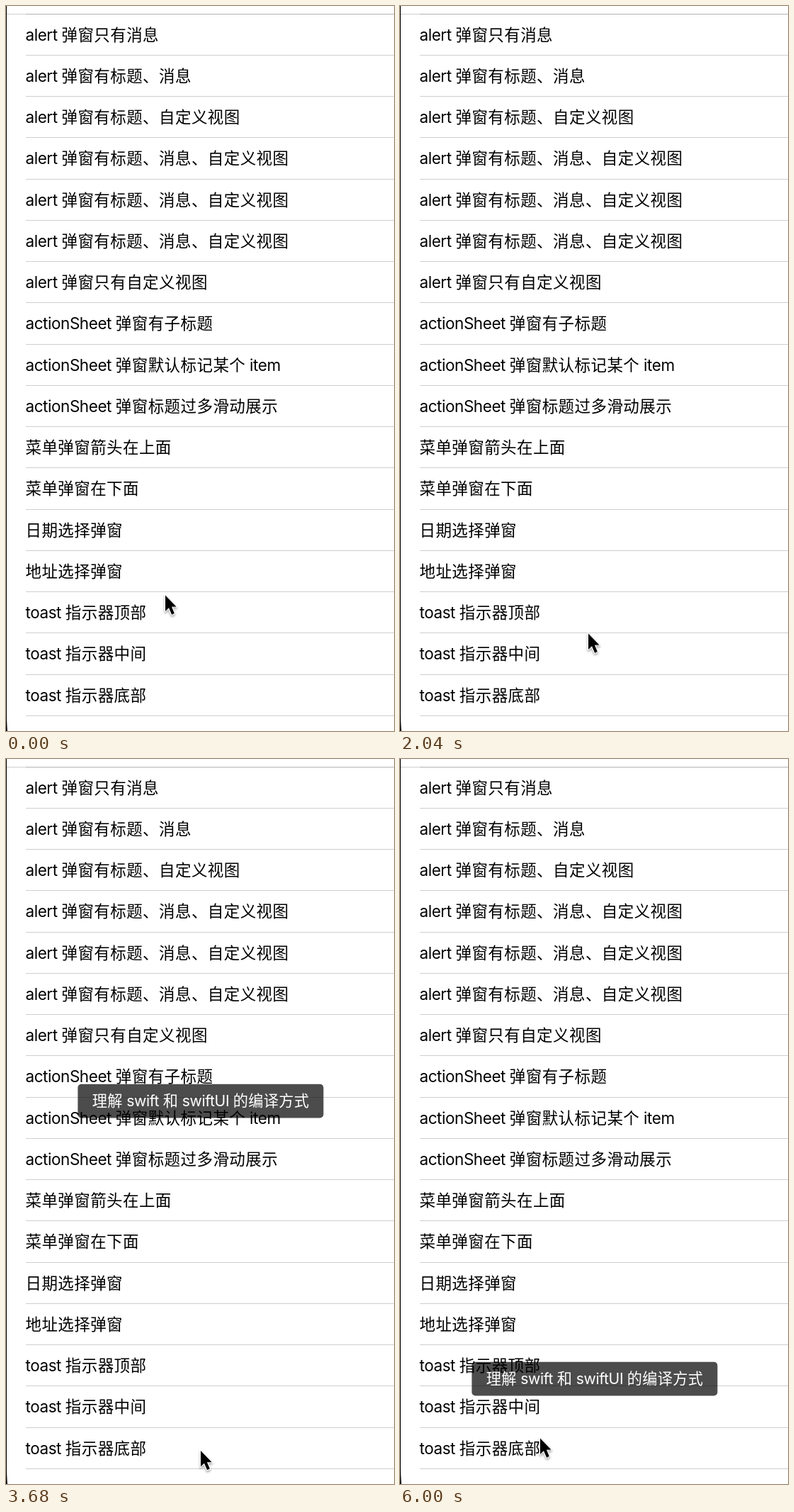
Write an HTML page that moves like this. It is 548 px wide and 1023 px high and loops after 6.16 s.

```html
<!DOCTYPE html>
<html lang="zh-CN">
<head>
<meta charset="utf-8">
<title>Toast</title>
<style>
html, body { margin: 0; width: 100%; height: 100%; overflow: hidden; background: #fff; }
svg { display: block; width: 548px; height: 1023px; }
text { font: 22.5px "Noto Sans CJK SC", "Noto Sans CJK", sans-serif; letter-spacing: .42px; }
.latin { font-family: Inter, sans-serif; letter-spacing: -.45px; }
.toast text { font-size: 21.2px; letter-spacing: .27px; fill: #fff; }
.toast .latin { letter-spacing: -.38px; }
.line { fill: #cfcfd1; shape-rendering: crispEdges; }
.press { fill: #d1d1d6; shape-rendering: crispEdges; }

.press, .toast, #cursor { animation: 6160ms linear infinite both; }
.press { opacity: 0; }
.press.top { animation-name: press-top; }
.press.mid { animation-name: press-mid; }
.press.low { animation-name: press-low; }
.toast.top { animation-name: toast-top; }
.toast.mid { animation-name: toast-mid; }
.toast.low { animation-name: toast-low; }
#cursor { animation-name: move; animation-timing-function: ease-in-out; }

@keyframes press-top {
  0%, 7.142% { opacity: 0; }
  7.143%, 7.792% { opacity: 1; }
  14.286%, 100% { opacity: 0; }
}
@keyframes press-mid {
  0%, 38.96% { opacity: 0; }
  38.961%, 43.506% { opacity: 1; }
  50%, 100% { opacity: 0; }
}
@keyframes press-low {
  0%, 74.674% { opacity: 0; }
  74.675%, 79.221% { opacity: 1; }
  85.714%, 100% { opacity: 0; }
}
@keyframes toast-top {
  0% { opacity: 0; }
  6.494% { opacity: 0; animation-timing-function: ease; }
  12.175%, 31.817% { opacity: 1; }
  31.818%, 100% { opacity: 0; }
}
@keyframes toast-mid {
  0% { opacity: 0; }
  42.614% { opacity: 0; animation-timing-function: ease; }
  48.295%, 67.694% { opacity: 1; }
  67.695%, 100% { opacity: 0; }
}
@keyframes toast-low {
  0% { opacity: 0; }
  78.247% { opacity: 0; animation-timing-function: ease; }
  83.929%, 100% { opacity: 1; }
}
@keyframes move {
  0%, .65% { transform: translate(225px, 831.5px); }
  2.597%, 14.61% { transform: translate(207px, 851.5px); }
  18.83% { transform: translate(280px, 857px); }
  23.377%, 31.2% { transform: translate(277px, 901px); }
  33.117% { transform: translate(266px, 885.5px); }
  38.961%, 44.4% { transform: translate(226px, 894.5px); }
  48% { transform: translate(279px, 919px); animation-timing-function: ease-out; }
  52.597% { transform: translate(275px, 981px); }
  56.494% { transform: translate(229px, 986px); }
  59.74% { transform: translate(275px, 976px); }
  62.987%, 63.636% { transform: translate(271px, 986px); }
  73.377%, 100% { transform: translate(198px, 958.5px); }
}
</style>
</head>
<body>
<svg viewBox="0 0 548 1023">
  <g id="list"></g>
  <path d="M0 0H1V1000Q1 1013 2 1023H0Z"/>
  <g id="toasts"></g>
  <g id="cursor">
    <path d="M0 0V22.4L5 17.8L9.1 27.2L12.9 25.6L8.9 16.3H15.7Z" stroke="#fff" stroke-width="2.6"
      paint-order="stroke" stroke-linejoin="round" style="filter: drop-shadow(0 2px 1.5px rgba(0,0,0,.35))"/>
  </g>
</svg>
<script>
const rows = [
  'alert 弹窗只有消息',
  'alert 弹窗有标题、消息',
  'alert 弹窗有标题、自定义视图',
  'alert 弹窗有标题、消息、自定义视图',
  'alert 弹窗有标题、消息、自定义视图',
  'alert 弹窗有标题、消息、自定义视图',
  'alert 弹窗只有自定义视图',
  'actionSheet 弹窗有子标题',
  'actionSheet 弹窗默认标记某个 item',
  'actionSheet 弹窗标题过多滑动展示',
  '菜单弹窗箭头在上面',
  '菜单弹窗在下面',
  '日期选择弹窗',
  '地址选择弹窗',
  'toast 指示器顶部',
  'toast 指示器中间',
  'toast 指示器底部'
];
const message = '理解 swift 和 swiftUI 的编译方式';
const pitch = 58.25, firstLine = 68.75;
const spots = { top: 54, mid: 459, low: 851 };

const label = (x, y, str) =>
  `<text x="${x}" y="${y}">${str.replace(/[A-Za-z ]+/g, '<tspan class="latin">$&</tspan>')}</text>`;
const rect = (cls, x, y, w, h) =>
  `<rect class="${cls}" x="${x}" y="${y}" width="${w}" height="${h}"/>`;

const presses = Object.keys(spots).map((name, i) =>
  rect('press ' + name, 1, firstLine + pitch * (13 + i), 547, pitch));
const lines = rows.map((row, i) => rect('line', 28, firstLine + pitch * i, 520, 1));
const labels = rows.map((row, i) => label(27.5, 48.5 + pitch * i, row));

list.innerHTML = presses.join('') + rect('line', 0, 11, 548, 1) +
  '<rect x="28" y="11" width="520" height="1" fill="#b2b2b4"/>' +
  lines.join('') + labels.join('');

toasts.innerHTML = Object.entries(spots).map(([name, y]) =>
  `<g class="toast ${name}">
    <rect x="101.4" y="${y - .2}" width="347" height="47.6" rx="5" fill="#000" fill-opacity=".7"/>
    ${label(121.8, y + 31, message)}
  </g>`).join('');
</script>
</body>
</html>
```
